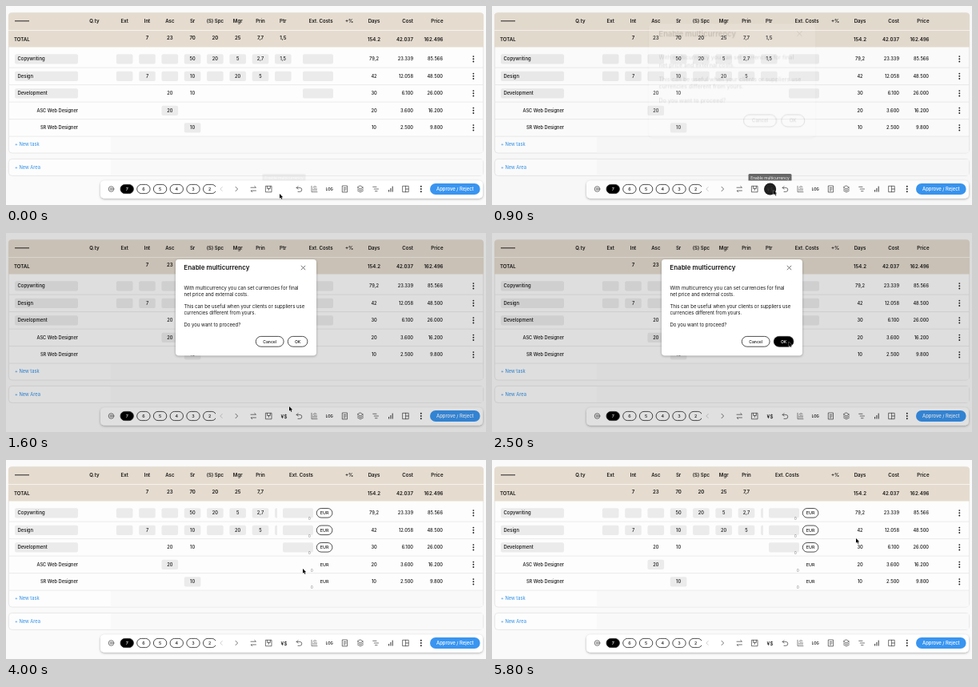
An HTML page that plays this animation: 600 by 249 pixels, repeating every 6900 ms.

```html
<!DOCTYPE html>
<html lang="en">
<head>
<meta charset="utf-8">
<title>Enable multicurrency</title>
<style>
  html, body { margin: 0; width: 100%; height: 100%; overflow: hidden; background: #fafafa; }
  svg { display: block; width: 100vw; height: 100vh; }
  text { font: 500 5.9px Inter, Roboto, sans-serif; fill: #161616; white-space: pre; }
  .b { font-weight: 600; font-size: 6.1px; }
  .r { font-weight: 400; font-size: 6px; }
  .num { font-size: 5.7px; }
  .blue { fill: #2f8fe8; font-size: 5.75px; font-weight: 400; }
  .tiny { fill: #777; font-size: 4.3px; font-weight: 400; }
  .button { font-size: 5.1px; }
  .box { fill: #ebebeb; }
  .line { stroke: #e6e6e6; stroke-width: .8; fill: none; }
  .card { fill: #fdfdfd; stroke: #e2e2e2; stroke-width: .8; }
  .pill { fill: #fff; stroke: #222; stroke-width: .8; }
  .icon { fill: none; stroke: #3c3c3c; stroke-width: .7; stroke-linecap: round; stroke-linejoin: round; }

  #before, #after, #tip, #disc, #yen, #shade, #modal, #panel, #ok, #okText, #saving, #cursor {
    animation: 6900ms step-end infinite;
  }
  #before { animation-name: before; }
  #after { animation-name: after; }
  #tip { animation-name: tip; }
  #disc { animation-name: disc; }
  #yen { animation-name: yen; }
  #shade { animation-name: shade; }
  #modal { animation-name: modal; transform-origin: 300px 93px; }
  #panel { animation-name: panel; }
  #ok { animation-name: ok; }
  #okText { animation-name: okText; }
  #saving { animation-name: saving; }
  #cursor { animation-name: cursor; }

  @keyframes before { 0% { opacity: 1 } 57.97%, 100% { opacity: 0 } }
  @keyframes after { 0% { opacity: 0 } 57.97%, 100% { opacity: 1 } }
  @keyframes tip {
    0% { opacity: .08 } 1.44% { opacity: .5 } 2.89% { opacity: .9 } 4.34% { opacity: 1 }
    14.49% { opacity: .06 } 15.94%, 100% { opacity: 0 }
  }
  @keyframes disc {
    0% { opacity: 0 } 1.44% { opacity: .5 } 2.89% { opacity: 1 }
    13.04% { opacity: .88 } 14.49% { opacity: .16 } 15.94%, 100% { opacity: 0 }
  }
  @keyframes yen {
    0% { opacity: 0; fill: #fff } 1.44% { opacity: .7; fill: #fff } 2.89% { opacity: 1; fill: #fff }
    13.04% { opacity: 1; fill: #333 } 14.49%, 100% { opacity: 1; fill: #222 }
  }
  @keyframes shade {
    0% { opacity: 0 } 13.04% { opacity: .01 } 14.49% { opacity: .11 }
    15.94% { opacity: .12 } 57.97%, 100% { opacity: 0 }
  }
  @keyframes modal {
    0% { opacity: 0; transform: scale(1.2) }
    11.59% { opacity: .03; transform: scale(1.2) }
    13.04% { opacity: .14; transform: scale(1.18) }
    14.49% { opacity: .93; transform: scale(1.04) }
    15.94% { opacity: .99; transform: scale(1.01) }
    17.39% { opacity: 1; transform: scale(1.003) }
    18.84% { opacity: 1; transform: none }
    57.97%, 100% { opacity: 0; transform: none }
  }
  @keyframes panel { 0% { height: 120.2px } 55.07%, 100% { height: 125.2px } }
  @keyframes ok {
    0% { fill: #fff }
    30.43% { fill: #fff; animation-timing-function: steps(4) }
    36.23%, 100% { fill: #000 }
  }
  @keyframes okText {
    0% { fill: #161616 }
    30.43% { fill: #161616; animation-timing-function: steps(4) }
    36.23%, 100% { fill: #fff }
  }
  @keyframes saving { 0% { opacity: 0 } 55.07%, 100% { opacity: 1 } }
  @keyframes cursor {
    0% { transform: translate(342px, 235px); animation-timing-function: steps(3) }
    4.34% { transform: translate(352px, 230.5px) }
    20.28% { transform: translate(352px, 230.5px); animation-timing-function: steps(2) }
    23.18% { transform: translate(354px, 217px); animation-timing-function: steps(3) }
    27.53% { transform: translate(362px, 162px); animation-timing-function: steps(2) }
    30.43% { transform: translate(367px, 144.5px); animation-timing-function: steps(4) }
    36.23% { transform: translate(371px, 136px) }
    72.46% { transform: translate(371px, 136px); animation-timing-function: steps(2) }
    75.36% { transform: translate(380px, 131px); animation-timing-function: steps(3) }
    79.7% { transform: translate(424px, 106px); animation-timing-function: steps(2) }
    82.6% { transform: translate(445px, 95px) }
    84.05%, 100% { transform: translate(455px, 98px) }
  }
</style>
</head>
<body>
<svg viewBox="0 0 600 249" preserveAspectRatio="none">
  <defs>
    <filter id="soft" x="-10%" y="-30%" width="120%" height="170%">
      <feDropShadow dx="0" dy="1" stdDeviation="1.5" flood-opacity=".3"/>
    </filter>
    <clipPath id="pages"><rect x="118" y="219" width="144" height="22"/></clipPath>
  </defs>

  <rect width="600" height="249" fill="#fafafa"/>
  <rect class="card" x="3.4" y="8.4" width="593.2" height="175.6" rx="4"/>
  <path d="M3 51.5V12.5a4 4 0 0 1 4-4H593a4 4 0 0 1 4 4V51.5Z" fill="#e5dccf"/>
  <path d="M3 30.5H597" stroke="#f6f2ec" stroke-width="1.2"/>
  <path d="M11 18.8H29" stroke="#222" stroke-width="1"/>
  <rect class="card" x="3.4" y="191.4" width="593.2" height="21" rx="4"/>
  <path d="M131 163.5H596V183.5H131ZM131 192H596V212H131Z" fill="#f9f9f9"/>
  <g id="table"></g>
  <g id="before"></g>
  <g id="after"></g>

  <g id="tip">
    <rect x="320.5" y="210" width="54" height="10" rx="1.5" fill="#686868"/>
    <text x="347.5" y="216.7" text-anchor="middle" style="fill:#fff;font-size:4.85px;font-weight:400">Enable multicurrency</text>
  </g>
  <rect x="118" y="218.5" width="478" height="22.2" rx="5" fill="#fff" filter="url(#soft)"/>
  <g id="numbers" clip-path="url(#pages)"></g>
  <g class="icon">
    <circle cx="131.5" cy="229" r="3.3"/><circle cx="131.5" cy="229" r="1.3"/>
    <path d="M270.2 226.5L267.8 229L270.2 231.5" stroke="#bbb"/>
    <path d="M287 226.3L289.6 229L287 231.7"/>
    <path d="M306 227.2H312.5L310.8 225.5M312.5 231H306L307.7 232.7"/>
    <path d="M324.8 225.3H332V232.8H324.8ZM326.5 225.5V228.4H330.3V225.5M328.4 228.4V230.5"/>
    <path d="M363.2 227.4H367.3A2.5 2.5 0 0 1 367.3 232.4H365M365 225.6L363.2 227.4L365 229.2"/>
    <path d="M382 225.3V232.7H389M384 231V229M386 231V227.5M388 231V228.4M384 227L386 225.5L388 226.5" stroke-width=".6"/>
    <path d="M420.7 225H426.5V233H420.7ZM422.3 227.4H425M422.3 229.2H425M422.3 231H424"/>
    <path d="M443 225L446.5 227L443 229L439.5 227ZM439.5 229L443 231L446.5 229M439.5 231L443 233L446.5 231"/>
    <path d="M458.7 226.3H463M460.2 229H465.5M461.5 231.7H464"/>
    <path d="M478.6 232.2V230.4M480.9 232.2V228.4M483.2 232.2V226" stroke-width="1"/>
    <path d="M496 225.3H503.2V232.7H496ZM499.6 225.3V232.7M499.6 229H503.2"/>
  </g>
  <text x="404.3" y="230.7" text-anchor="middle" style="font-size:4.4px;font-weight:600">LOG</text>
  <circle id="disc" cx="347.6" cy="229" r="7.6"/>
  <text id="yen" x="347.6" y="231.5" text-anchor="middle" style="font-size:6.7px">¥$</text>
  <rect x="530" y="222" width="62.6" height="14" rx="7" fill="#3995f0"/>
  <text x="561.3" y="231.2" text-anchor="middle" style="fill:#fff">Approve / Reject</text>
  <g id="dots"></g>

  <rect id="shade" width="600" height="249"/>
  <g id="modal">
    <rect id="panel" x="212" y="33" width="176" height="120.2" rx="4" fill="#fff" filter="url(#soft)"/>
    <text x="222.3" y="46.4" style="font-size:8px;font-weight:600">Enable multicurrency</text>
    <path class="icon" d="M369.1 41.1L373.9 45.9M373.9 41.1L369.1 45.9"/>
    <g id="message"></g>
    <rect class="pill" x="312.3" y="129.4" width="34.8" height="12.8" rx="6.4"/>
    <text class="button" x="329.7" y="137.6" text-anchor="middle">Cancel</text>
    <rect class="pill" id="ok" x="352.3" y="129.4" width="24.6" height="12.8" rx="6.4"/>
    <text class="button" id="okText" x="364.6" y="137.6" text-anchor="middle">OK</text>
    <text class="blue" id="saving" x="222.4" y="150.4" style="font-size:5.2px">Saving...</text>
  </g>
  <path id="cursor" d="M0 0V5.8L1.4 4.5L2.4 6.8L3.4 6.4L2.4 4.2H4.2Z" stroke="#fff" stroke-width=".5" paint-order="stroke"/>
</svg>
<script>
  const fill = (id, html) => { document.getElementById(id).innerHTML += html; };
  const label = (x, y, s, cls = '', anchor = 'middle') =>
    `<text class="${cls}" x="${x}" y="${y + 2.1}" text-anchor="${anchor}">${s}</text>`;
  const box = (x, y, w) =>
    `<rect class="box" x="${x}" y="${y - 6}" width="${w}" height="12.3" rx="2"/>`;
  const menu = (x, y) => [-3.2, 0, 3.2].map(d =>
    `<circle cx="${x}" cy="${y + d}" r=".95" fill="#222"/>`).join('');

  const colX = i => 148.2 + 28.3 * i;
  const rowY = i => 66.3 + 21.5 * i;
  const cell = (x, y, s) => box(x - 10.3, y, 20.6) + label(x, y, s, 'num');

  // Header and totals
  const heads = ['Ext', 'Int', 'Asc', 'Sr', '(S) Spc', 'Mgr', 'Prin'];
  const totals = ['', '7', '23', '70', '20', '25', '7,7'];
  const sumY = 39.5;
  heads.forEach((h, i) => fill('table', label(colX(i), 18.6, h, 'b') + label(colX(i), sumY, totals[i], 'b')));
  fill('table',
    label(110.5, 18.6, 'Q.ty', 'b') + label(429, 18.6, '+%', 'b') + label(460, 18.6, 'Days', 'b') +
    label(509, 18.6, 'Cost', 'b', 'end') + label(546.5, 18.6, 'Price', 'b', 'end') +
    label(10, 41.7, 'TOTAL', 'b', 'start') + label(460, 41.7, '154.2', 'b') +
    label(509, 41.7, '42.037', 'b', 'end') + label(546.5, 41.7, '162.496', 'b', 'end'));

  // Rows: name, hours by column, days, cost, price
  const rows = [
    ['Copywriting', ['', '', '', '50', '20', '5', '2,7'], '79,2', '23.339', '85.566'],
    ['Design', ['', '7', '', '10', '', '20', '5'], '42', '12.058', '48.500'],
    ['Development', [], '30', '6.100', '26.000'],
    ['ASC Web Designer', [, , '20'], '20', '3.600', '16.200'],
    ['SR Web Designer', [, , , '10'], '10', '2.500', '9.800']
  ];
  rows.forEach(([name, hours, days, cost, price], i) => {
    const y = rowY(i), main = i < 3;
    fill('table',
      `<path class="line" d="M3.4 ${y + 10.8}H596.6"/>` +
      (main ? box(11, y, 79) + label(14.5, y, name, '', 'start') : label(90, y, name, 'num', 'end')) +
      hours.map((h, c) => cell(colX(c), y, h)).join('') +
      label(460, y, days, 'num') + label(509, y, cost, 'num', 'end') + label(546, y, price, 'num', 'end') +
      menu(584.3, y));
    if (main) fill('before', box(371, y, 38));
    fill('after',
      (main ? box(346, y, 38) +
        `<rect class="pill" x="388.3" y="${y - 5.8}" width="19.6" height="11.6" rx="5.8"/>` : '') +
      `<text x="398.1" y="${y + 1.9}" text-anchor="middle" style="font-size:5.3px">EUR</text>` +
      label(main ? 379.3 : 382.3, y + 6.8, '0', 'tiny'));
  });
  fill('table', label(204.8, rowY(2), '20', 'num') + label(233.1, rowY(2), '10', 'num') +
    label(11, 173.3, '+ New task', 'blue', 'start') + label(11, 201.8, '+ New Area', 'blue', 'start'));

  // Last columns, wide and narrow layouts
  const ptr = colX(7);
  fill('before', label(ptr, 18.6, 'Ptr', 'b') + label(ptr, sumY, '1,5', 'b') +
    label(393.7, 18.6, 'Ext. Costs', 'b') + cell(ptr, rowY(0), '1,5') + cell(ptr, rowY(1), ''));
  fill('after', label(369, 18.6, 'Ext. Costs', 'b') + [0, 1].map(i =>
    `<path class="box" d="M339 ${rowY(i) - 6}H338a2 2 0 0 0-2 2v8.3a2 2 0 0 0 2 2H339Z"/>`).join(''));

  // Toolbar
  ['7', '6', '5', '4', '3', '2'].forEach((n, i) => {
    const x = 151.2 + 20.7 * i, on = i === 0;
    fill('numbers',
      `<rect class="pill" x="${x - 8.2}" y="223.4" width="16.4" height="11.2" rx="5.6"${on ? ' style="fill:#000"' : ''}/>` +
      `<text x="${x}" y="231" text-anchor="middle" style="font-size:5.4px${on ? ';fill:#fff' : ''}">${n}</text>`);
  });
  fill('dots', menu(518.8, 229));

  // Dialog text
  [[68.8, 'With multicurrency you can set currencies for final'],
   [76.8, 'net price and external costs.'],
   [91.8, 'This can be useful when your clients or suppliers use'],
   [99.8, 'currencies different from yours.'],
   [114.5, 'Do you want to proceed?']
  ].forEach(([y, s]) => fill('message', label(222.4, y, s, 'r', 'start')));
</script>
</body>
</html>
```
